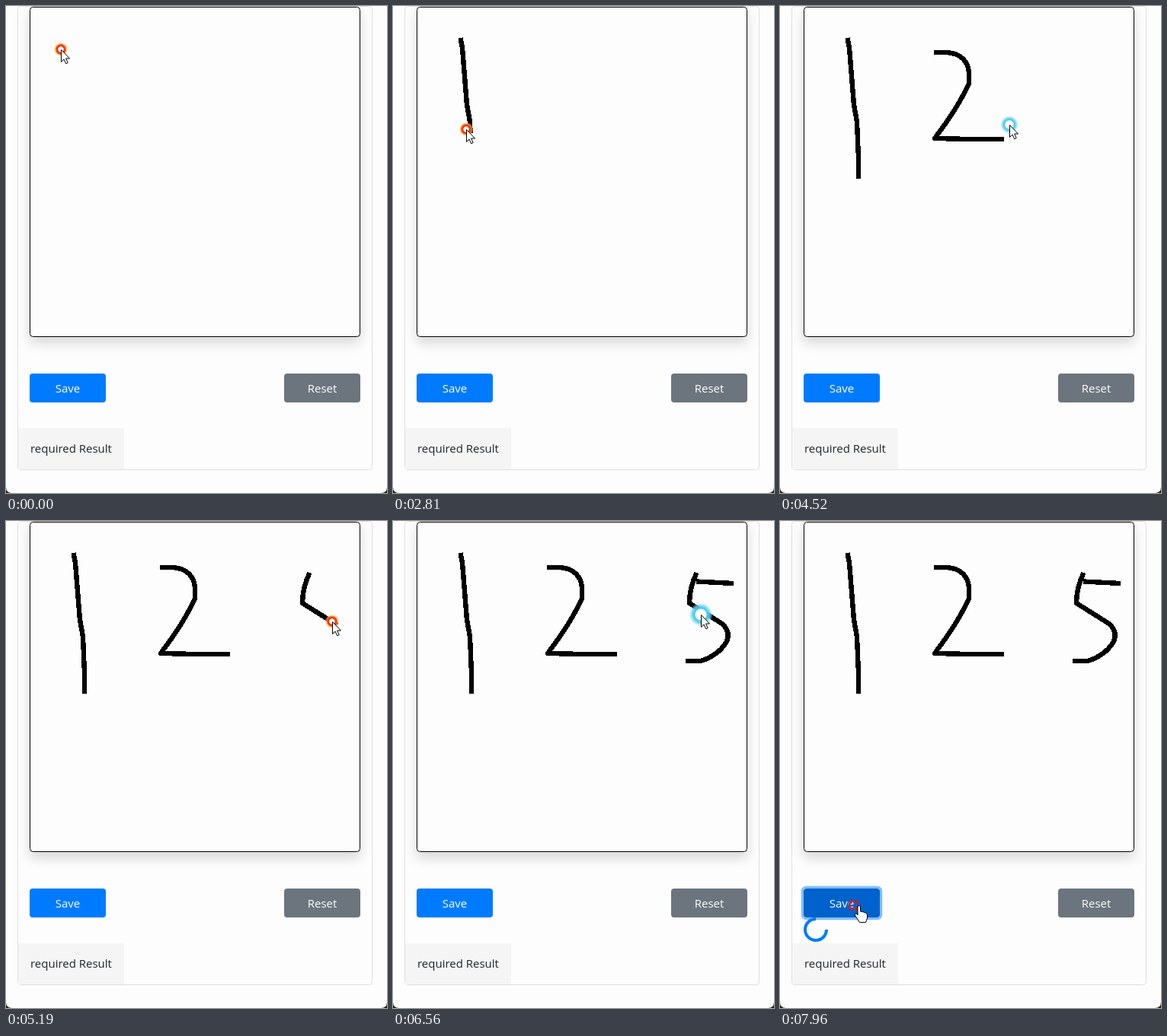
An HTML page for the animation above (8000 ms loop, 500x640 px).

```html
<!DOCTYPE html>
<html lang="en">
<head>
<meta charset="utf-8">
<title>Handwriting pad</title>
<style>
  html, body { margin: 0; width: 100%; height: 100%; overflow: hidden; background: #262600; }
  svg { display: block; }
  text { font: 15px "Open Sans", "Noto Sans", sans-serif; }
  #pad { filter: drop-shadow(0 8px 8px rgba(0, 0, 0, .15)); }
  #ink { fill: none; stroke: #000; stroke-width: 6.4; stroke-linejoin: round; shape-rendering: crispEdges; }
  #arrow, #hand { fill: #fff; stroke: #000; }
</style>
</head>
<body>
<svg width="500" height="640" viewBox="0 0 500 640">
  <defs>
    <radialGradient id="red">
      <stop offset=".34" stop-color="#fff"/>
      <stop offset=".44" stop-color="#ee2c10"/>
      <stop offset=".64" stop-color="#f04a14"/>
      <stop offset=".8" stop-color="#ffb850" stop-opacity=".7"/>
      <stop offset="1" stop-color="#ffe680" stop-opacity="0"/>
    </radialGradient>
    <radialGradient id="cyan">
      <stop offset=".4" stop-color="#fff"/>
      <stop offset=".54" stop-color="#3cc8ea"/>
      <stop offset=".75" stop-color="#70d8f0" stop-opacity=".8"/>
      <stop offset="1" stop-color="#c0f0f4" stop-opacity="0"/>
    </radialGradient>
  </defs>

  <path d="M0 0H500V632Q500 640 492 640H8Q0 640 0 632Z" fill="#fdfdfd"/>
  <rect x="15.5" y=".5" width="465" height="609" rx="4" fill="none" stroke="#dfdfdf"/>
  <rect x="16" y="555" width="139" height="54" fill="#f5f5f5"/>
  <rect id="pad" x="31.5" y="1.5" width="433" height="433" rx="4" fill="#fdfdfd" stroke="#000"/>

  <rect id="focus" x="29.4" y="481.4" width="103.2" height="41.2" rx="5" fill="none" stroke="#80bdff" stroke-width="3.2"/>
  <rect id="save" x="31" y="483" width="100" height="38" rx="4"/>
  <rect x="365" y="483" width="100" height="38" rx="4" fill="#6c757d"/>
  <g text-anchor="middle" fill="#fff">
    <text x="81" y="508">Save</text>
    <text x="415" y="508">Reset</text>
  </g>
  <text x="32" y="587" fill="#212529">required Result</text>

  <path id="spinner" d="M56.9 527.1A14 14 0 1 0 56.9 546.9" fill="none" stroke="#007bff" stroke-width="4"/>

  <g id="ink">
    <path data-time="2290 3060" d="M88.5 42L91 55 97 130 101 152 103 200V227"/>
    <path data-time="3590 4240" d="M202 61H216C236 61 248 72 248 90V102Q238 124 219 152L203 174 250 175H294"/>
    <path data-time="4700 5640" d="M398.5 68Q389 88 389 108L432 135Q444 146 437 160 426 177 404 184H384"/>
    <path data-time="5990 6400" d="M398 79.5L447 82"/>
  </g>

  <g id="cursor">
    <circle id="glow"/>
    <circle id="ring" r="6" fill="none" stroke="#c81e28" stroke-width="2.5"/>
    <path id="arrow" d="M.5 .5V16.5L4 13 6.7 18.8 9.2 17.6 6.6 12H11.5Z"/>
    <path id="hand" d="M5 2Q5 .5 6.7 .5T8.5 2V8L12 8.7 15.5 10Q17.5 11 17.5 13V17L15.5 22.5H7.5L2 14Q.5 12 2 11T5 13Z"/>
  </g>
</svg>
<script>
const LOOP = 8000, HOVER = 7040, CLICK = 7230, LOADING = 7304;
const $ = id => document.getElementById(id);
const clamp = v => Math.min(1, Math.max(0, v));
const smooth = v => v * v * (3 - 2 * v);
const show = (el, on) => el.setAttribute('visibility', on ? 'visible' : 'hidden');

const strokes = [...$('ink').children].map(el => {
  const [start, end] = el.dataset.time.split(' ').map(Number);
  return { el, start, end, len: el.getTotalLength() };
});

// The pointer sits up and left of the pen tip
function penAt(s, k) {
  const p = s.el.getPointAtLength(s.len * k);
  return { x: p.x - 6, y: p.y - 5 };
}

// Pointer stops between strokes; the stroke ends join them in order of time
const stop = (t, x, y) => ({ t, x, y });
const stops = [
  stop(0, 72, 57), stop(330, 73, 45), stop(780, 73, 45), stop(960, 81, 39), stop(3520, 192, 57),
  stop(4520, 301, 156), stop(5780, 381, 94), stop(7190, 98, 505), stop(LOOP, 97, 505),
  ...strokes.flatMap(s => [{ t: s.start, ...penAt(s, 0) }, { t: s.end, ...penAt(s, 1) }])
].sort((a, b) => a.t - b.t);

function pointer(t) {
  const s = strokes.find(s => t >= s.start && t < s.end);
  if (s) return penAt(s, (t - s.start) / (s.end - s.start));
  const i = stops.findIndex(p => p.t > t);
  const a = stops[i - 1], b = stops[i];
  const k = smooth((t - a.t) / (b.t - a.t));
  return { x: a.x + (b.x - a.x) * k, y: a.y + (b.y - a.y) * k };
}

function mix(a, b, k) {
  return `rgb(${a.map((v, i) => Math.round(v + (b[i] - v) * k))})`;
}

// The glow swells on press and flashes cyan on release
function drawGlow(t) {
  const last = strokes.filter(s => t >= s.start).pop();
  let r = 9.5, colour = 'red';
  if (last && t < last.end) {
    r += 3.5 * (1 - clamp((t - last.start) / 300));
  } else if (last && t < last.end + 350) {
    colour = 'cyan';
    r = 21 - 11 * (t - last.end) / 350;
  }
  $('glow').setAttribute('r', r);
  $('glow').setAttribute('fill', `url(#${colour})`);
}

function drawSave(t) {
  const blue = [0, 123, 255], hover = [0, 105, 217], active = [0, 98, 204];
  const pressed = clamp((t - CLICK) / 150);
  const base = pressed ? hover : blue;
  const k = pressed || clamp((t - HOVER) / 150);
  $('save').setAttribute('fill', mix(base, pressed ? active : hover, k));
  $('focus').setAttribute('opacity', pressed);
}

function frame(now) {
  const t = now % LOOP;
  for (const s of strokes) {
    const k = clamp((t - s.start) / (s.end - s.start));
    s.el.setAttribute('stroke-dasharray', k < 1 ? `${s.len * k} 9999` : 'none');
    show(s.el, k > 0);
  }

  const { x, y } = pointer(t);
  $('cursor').setAttribute('transform', `translate(${Math.round(x)} ${Math.round(y)})`);
  const over = t >= HOVER;
  for (const id of ['arrow', 'glow']) show($(id), !over);
  for (const id of ['hand', 'ring']) show($(id), over);
  drawGlow(t);
  drawSave(t);

  show($('spinner'), t >= LOADING);
  $('spinner').setAttribute('transform', `rotate(${(t - LOADING) / 750 * 360} 47 537)`);
  requestAnimationFrame(frame);
}
requestAnimationFrame(frame);
</script>
</body>
</html>
```
